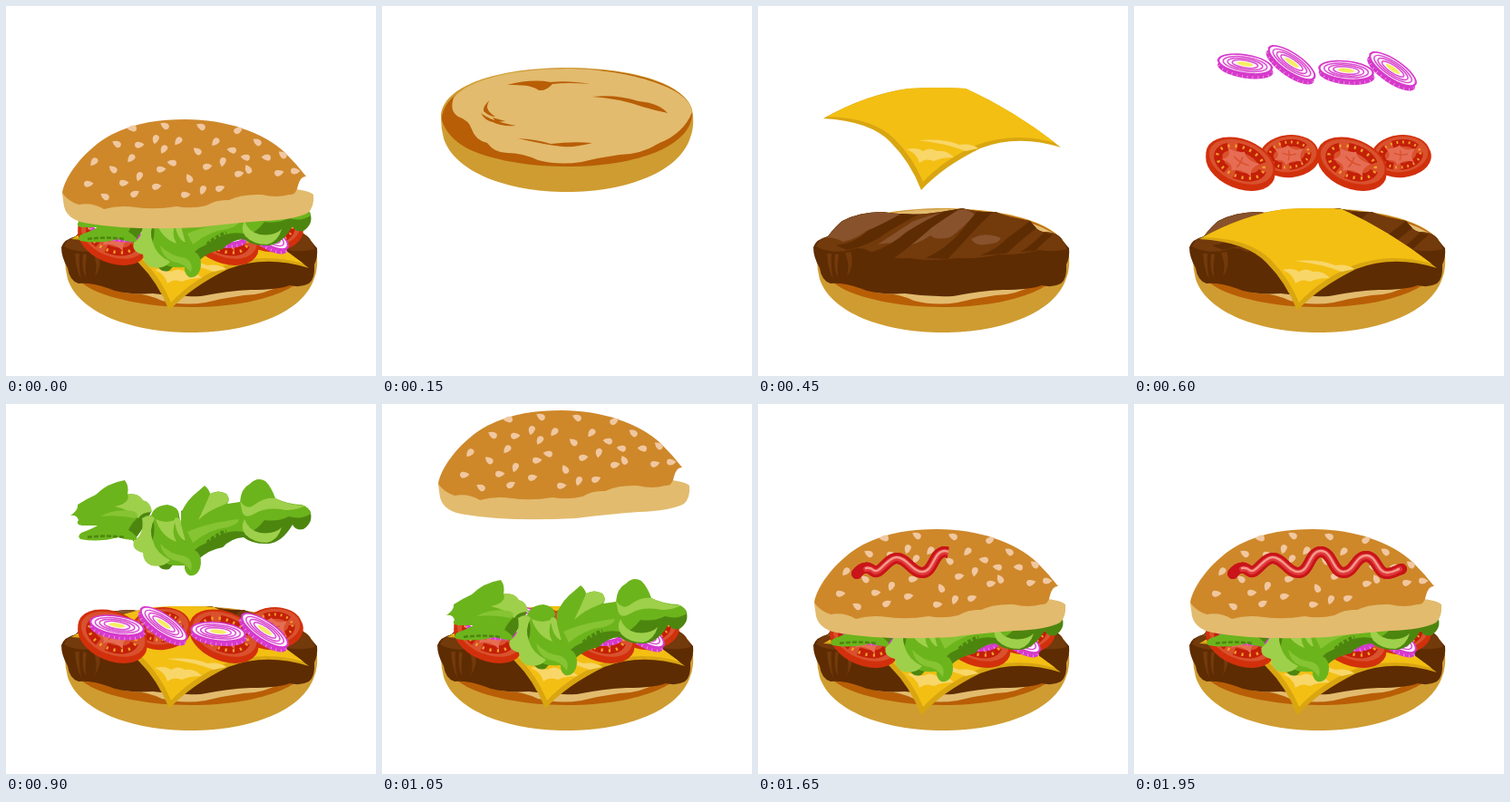
Write an HTML page that moves like this. It is 408 by 408 pixels and loops after 2250 ms.

```html
<!DOCTYPE html>
<html lang="en">
<head>
<meta charset="utf-8">
<title>Burger</title>
<style>
  html, body { margin: 0; width: 100%; height: 100%; overflow: hidden; background: #fff; }
  svg { display: block; width: 100vw; height: 100vh; }
  .part { animation: 2250ms step-end infinite; }
  #base { animation-name: base; }
  #patty { animation-name: patty; }
  #cheese { animation-name: cheese; }
  #tomatoes { animation-name: tomatoes; }
  #onions { animation-name: onions; }
  #lettuce { animation-name: lettuce; }
  #top { animation-name: top; }
  #reveal { animation-name: reveal; }

  /* each part enters above the stack, lands, then gets squeezed by the top */
  @keyframes base {
    0% { transform: none; }
    6.66% { transform: translateY(-155px); }
    13.33%, 100% { transform: none; }
  }
  @keyframes patty {
    0% { transform: none; }
    6.66% { transform: translateY(-500px); }
    13.33% { transform: translateY(-117px); }
    20%, 100% { transform: none; }
  }
  @keyframes cheese {
    0% { transform: none; }
    6.66% { transform: translateY(-500px); }
    20% { transform: translateY(-133px); }
    26.66% { transform: none; }
    60%, 100% { transform: translateY(7px); }
  }
  @keyframes tomatoes {
    0% { transform: none; }
    6.66% { transform: translateY(-500px); }
    26.66% { transform: translateY(-82px); }
    33.33% { transform: none; }
    60%, 100% { transform: translateY(5px); }
  }
  @keyframes onions {
    0% { transform: none; }
    6.66% { transform: translateY(-500px); }
    26.66% { transform: translateY(-180px); }
    33.33% { transform: translateY(-86px); }
    40% { transform: none; }
    60%, 100% { transform: translateY(6px); }
  }
  @keyframes lettuce {
    0% { transform: none; }
    6.66% { transform: translateY(-500px); }
    33.33% { transform: translateY(-164px); }
    40% { transform: translateY(-110px); }
    46.66% { transform: none; }
    60%, 100% { transform: translateY(7px); }
  }
  @keyframes top {
    0% { transform: translateY(-3px); }
    6.66% { transform: translateY(-500px); }
    46.66% { transform: translateY(-121px); }
    53.33% { transform: none; }
    60%, 100% { transform: translateY(10px); }
  }
  @keyframes reveal {
    0% { transform: none; }
    66.66% { transform: translateX(155px); }
    73.33% { transform: translateX(212px); }
    80% { transform: translateX(259px); }
    86.66%, 100% { transform: translateX(312px); }
  }
</style>
</head>
<body>
<svg viewBox="0 0 408 408">
  <defs>
    <g id="tomato">
      <ellipse cx="1.5" cy="4" rx="40" ry="25" fill="#d2300c"/>
      <ellipse rx="40" ry="25" fill="#d2300c"/>
      <ellipse cx=".5" cy="-.5" rx="37" ry="22.5" fill="#d9512d"/>
      <g fill="none">
        <ellipse rx="26" ry="15" stroke="#c41f08" stroke-width="9" stroke-dasharray="34 10"/>
        <ellipse rx="27" ry="16" stroke="#f2a32a" stroke-width="3.4" stroke-dasharray="2.2 6"/>
      </g>
      <path fill="#e66d54" d="M-19-9Q-6-8 0-12Q5-3 21-6Q11 2 17 11Q4 5-6 13Q-6 4-21 5Q-10-1-19-9Z"/>
      <path fill="none" stroke="#d9512d" stroke-width="1.6" d="M-9-3Q0 2 10 0M0-6Q1 2-2 7"/>
    </g>
    <g id="onion">
      <ellipse cx="1" cy="5" rx="31" ry="10.5" fill="#d63acb"/>
      <ellipse cx="1" cy="4" rx="30" ry="9.8" fill="none" stroke="#f0a4e8" stroke-width="3" stroke-dasharray=".8 5"/>
      <ellipse rx="31" ry="10.8" fill="#d63acb"/>
      <ellipse rx="28.6" ry="9.2" fill="#fff2fd"/>
      <g fill="none" stroke="#d94ccf" stroke-width="1.5">
        <ellipse rx="24.5" ry="7.6"/>
        <ellipse rx="19.5" ry="5.9"/>
        <ellipse rx="14.3" ry="4.1"/>
      </g>
      <ellipse rx="9" ry="2.3" fill="#f5ee62"/>
    </g>
    <path id="seed" fill="#f0c7a0" d="M-5.5 0Q-2-3.6 1.6-3.5Q5-3.2 5 .2Q4.8 3.5 1.4 3.4Q-2 3.3-5.5 0Z"/>
    <clipPath id="squeezed"><path id="reveal" class="part" d="M-400 150H0L-8 200H-400Z"/></clipPath>
  </defs>

  <g id="base" class="part">
    <path fill="#cf9c31" d="M65 278C65 242 130 223 204 223S343 242 343 276Q344 290 340 300C328 338 270 360 204 360S80 338 68 301Q65 290 65 278Z"/>
    <path fill="#b85e06" d="M66 281C65 246 128 224 204 224S342 244 342 275C340 308 285 332 204 332C150 332 112 321 94 312Q72 300 66 281Z"/>
    <path fill="#e2bb6e" d="M79 256C96 236 145 224 204 224S341 243 342 272C336 288 322 300 306 306Q285 319 262 319Q240 322 220 327Q195 331 172 325Q155 317 138 317Q124 317 116 306Q103 303 99 291Q96 281 84 277Q74 271 79 256Z"/>
    <g fill="#b85e06">
      <path d="M138 242Q165 235 186 239Q205 237 229 241Q205 239 188 241Q181 249 173 248Q165 241 138 242Z"/>
      <path d="M232 255Q258 252 283 260Q305 262 315 273Q300 270 287 266Q262 257 232 255Z"/>
      <path d="M150 301Q170 302 186 307Q210 304 232 306Q214 311 199 310Q180 308 150 301Z"/>
      <path d="M119 259Q111 265 112 271Q119 277 125 277Q117 272 116 267Q116 262 119 259ZM109 273Q120 282 148 287Q131 288 122 283Q113 281 109 273ZM122 278L136 282L126 283Z"/>
    </g>
  </g>

  <g id="patty" class="part"><g transform="translate(0 117)">
    <path fill="#5e2c02" d="M61 149Q64 140 77 137Q85 126 93 120Q112 110 137 110Q165 114 186 112Q212 109 225 106Q243 111 262 110Q275 116 300 120Q306 130 314 132Q332 132 336 142L343 150Q344 160 340 168Q341 184 334 189Q325 194 313 191Q300 196 270 196Q245 197 215 203Q188 204 162 200Q130 202 112 194Q95 188 80 189Q70 186 68 172Q61 160 61 149Z"/>
    <path fill="#733a0c" d="M64 148Q66 140 78 137Q85 126 93 120Q112 110 137 110Q165 114 186 112Q212 109 225 106Q243 111 262 110Q275 116 300 120Q306 130 314 132Q332 132 337 144L341 151Q325 155 310 152Q290 158 265 157Q245 162 220 161Q190 165 165 161Q140 163 122 153Q112 147 98 153Q78 156 64 148Z"/>
    <g fill="#87522c">
      <path d="M76 139Q84 127 94 120Q112 111 137 110Q150 112 157 113Q140 124 121 130Q108 140 94 143Q82 137 76 139Z"/>
      <path d="M132 146Q150 134 170 121Q190 112 228 107Q236 110 239 113Q226 128 212 138Q196 142 190 136Q178 145 162 148Q148 142 132 146Z"/>
      <path d="M235 140Q250 131 268 139Q266 145 251 146Q240 148 235 140Z"/>
    </g>
    <g fill="#5e2c02">
      <path d="M86 147Q108 144 121 131Q140 122 158 112L177 113Q158 123 145 131Q122 148 98 152Z"/>
      <path d="M124 155Q146 148 164 132Q188 117 207 109L222 107Q206 117 192 127Q168 148 150 161Q135 162 124 155Z"/>
      <path d="M185 161Q204 152 218 138Q232 122 241 110L259 110Q247 121 235 134Q220 151 209 162Z"/>
      <path d="M245 158Q264 151 276 138Q290 128 300 120L307 128Q291 140 274 156Z"/>
      <path d="M290 154Q304 145 315 133L325 135Q313 145 306 153Z"/>
    </g>
    <path fill="#733a0c" d="M76 156Q77 174 83 184Q80 170 81 156ZM85 156Q83 172 88 183Q87 169 89 157ZM96 155Q102 169 98 182Q107 168 102 154Z"/>
  </g></g>

  <g id="cheese" class="part">
    <path fill="#d9a611" d="M72 257Q120 230 166 224Q200 222 229 224Q282 248 334 289Q286 274 245 290Q204 310 180 336Q168 305 146 283Q124 260 72 257Z"/>
    <path fill="#f3bf13" d="M76 255Q120 231 166 224Q200 222 229 224Q282 248 328 284Q284 271 242 286Q205 302 182 327Q171 300 150 279Q126 256 76 255Z"/>
    <g fill="#f8d668">
      <path d="M164 291Q175 288 182 293Q190 288 197 293Q208 291 216 300Q202 300 194 304Q185 300 178 306Q176 296 164 291Z"/>
      <path d="M177 281Q205 279 222 286Q235 284 243 290L229 293Q205 284 177 281Z"/>
    </g>
  </g>

  <g id="tomatoes" class="part">
    <use href="#tomato" transform="translate(171 246) rotate(-6) scale(.81 .87)"/>
    <use href="#tomato" transform="translate(117.5 254) rotate(22)"/>
    <use href="#tomato" transform="translate(294 246) rotate(-6) scale(.81 .87)"/>
    <use href="#tomato" transform="translate(240.5 254) rotate(22)"/>
  </g>

  <g id="onions" class="part">
    <use href="#onion" transform="translate(122.5 244) rotate(9)"/>
    <use href="#onion" transform="translate(174 242.5) rotate(34)"/>
    <use href="#onion" transform="translate(234 251) rotate(6)"/>
    <use href="#onion" transform="translate(285.5 249.5) rotate(34)"/>
  </g>

  <g id="lettuce" class="part"><g transform="translate(0 110)">
    <path fill="#4d860f" d="M193 118Q236 102 246 112L262 107Q270 120 298 112L335 117Q340 130 328 138Q319 140 316 133Q305 152 290 154Q272 155 262 147Q248 148 239 158Q225 160 211 172L195 155Z"/>
    <path fill="#6cb41c" d="M193 120Q200 105 211 97L219 90Q224 94 225 99Q234 94 243 99Q248 105 244 110L258 108Q259 93 269 88Q277 80 286 85Q293 92 297 104Q312 111 326 111Q334 113 336 121Q326 128 312 124Q300 130 285 128Q272 145 262 141Q245 138 232 147Q222 153 213 157L203 165L193 150Z"/>
    <path fill="#9ed04b" d="M225 99Q235 94 243 99Q250 108 238 112Q222 118 212 128Q222 107 225 99ZM258 107Q266 118 274 111Q286 102 297 104Q312 112 330 112Q316 119 303 116Q286 114 274 121Q262 128 260 117ZM263 127Q267 139 280 142Q296 144 304 136Q300 150 288 153Q273 153 264 144Q258 137 263 127Z"/>
    <path fill="#86c433" d="M200 141Q222 131 257 127Q256 133 244 136Q224 138 206 153Z"/>
    <path fill="none" stroke="#4d860f" stroke-width="4" stroke-dasharray="4 2" d="M218 160Q226 148 241 146M222 153Q230 145 243 140"/>

    <path fill="#4d860f" d="M118 133Q140 112 160 119L154 132Q148 142 140 152Q140 142 130 141Z"/>
    <path fill="#6cb41c" d="M71 123Q80 117 79 111Q88 105 99 100Q112 87 131 84Q136 91 134 99Q145 98 150 105Q155 116 148 123Q139 130 135 139Q145 145 145 150Q135 151 124 147Q102 153 82 149Q78 146 83 142Q94 138 101 134L84 134Q76 133 80 128Q78 122 71 123Z"/>
    <path fill="#9ed04b" d="M134 99Q147 98 151 106Q160 108 161 119Q150 119 146 126Q138 117 120 113Q138 109 134 99Z"/>
    <path fill="#86c433" d="M104 124Q120 115 139 118Q149 121 142 126Q124 122 104 124Z"/>
    <path fill="none" stroke="#4d860f" stroke-width="2.5" stroke-dasharray="5 2" d="M90 147Q110 144 130 147"/>
    <path fill="#4d860f" d="M150 128Q168 116 190 120L200 160L180 182Q172 184 168 178Q150 172 150 150Z"/>
    <path fill="#6cb41c" d="M160 123Q163 112 178 111Q190 113 191 122Q187 129 192 140Q196 155 211 163Q217 170 214 181Q210 191 202 189Q196 185 197 178Q180 180 168 171Q158 160 163 145Q165 133 160 123Z"/>
    <path fill="#9ed04b" d="M150 126Q159 120 164 126Q157 139 162 151Q165 164 181 172Q174 181 160 178Q151 174 151 164Q138 161 141 151Q153 143 150 126ZM165 127Q177 133 188 127Q181 141 188 152Q171 146 165 127ZM186 126Q193 123 193 132L198 151Q187 146 186 126Z"/>
    <path fill="#86c433" d="M170 154Q181 166 198 168Q207 173 204 184Q196 173 184 172Q172 167 170 154Z"/>
  </g></g>

  <g id="top" class="part">
    <path fill="#e2bb6e" d="M62 210Q70 200 200 200T339 211Q340 225 333 231Q318 239 283 240Q245 243 214 247Q140 251 92 243Q68 240 64 224Z"/>
    <path fill="#ce882a" d="M62 209C65 190 88 160 116 145C144 131 170 128 198 128C242 128 284 142 308 165Q321 178 331 191Q325 190 322 201Q320 212 312 211Q298 215 282 211Q260 210 246 217Q232 216 221 223Q205 227 188 224Q165 228 143 225Q125 222 108 227Q95 219 80 222Q68 218 62 209Z"/>
    <g id="seeds"></g>
  </g>

  <g clip-path="url(#squeezed)" fill="none" stroke-linecap="round">
    <path id="sauce" stroke="#c9141a" stroke-width="12" d="M109 187C116 178 122 180 127 184C134 190 142 170 153 170C164 170 170 186 181 186C194 186 193 163 206 163C219 163 219 186 231 186C243 186 244 168 256 168C268 168 268 187 279 187C286 187 290 183 295 182"/>
    <use href="#sauce" id="glow"/>
    <path stroke="#e0383a" stroke-width="6" d="M119 182Q124 181 127 184C134 190 142 170 153 170C164 170 170 186 181 186C194 186 193 163 206 163C219 163 219 186 231 186C243 186 244 168 256 168C268 168 268 187 279 187C286 187 290 183 293 182"/>
    <path stroke="#f39a8c" stroke-width="2.4" d="M119 181Q124 180 127 183C134 189 142 169 153 169C164 169 170 185 181 185C194 185 193 162 206 162C219 162 219 185 231 185C243 185 244 167 256 167C268 167 268 186 279 186C286 186 289 183 292 182"/>
  </g>
</svg>
<script>
  // x, y, angle
  const seeds = [
    [139, 138, 0], [175, 135, 30], [215, 136, 25], [256, 140, 150], [122, 155, 30],
    [147, 156, 175], [165, 150, 285], [190, 152, 310], [174, 161, 300], [211, 163, 40],
    [231, 153, 310], [249, 162, 10], [277, 153, 35], [305, 167, 40], [287, 170, 5],
    [264, 170, 10], [97, 175, 310], [118, 183, 40], [138, 171, 310], [183, 176, 10],
    [171, 183, 175], [222, 180, 170], [239, 175, 280], [147, 191, 290], [130, 198, 175],
    [91, 199, 175], [166, 202, 170], [202, 193, 60], [236, 204, 160], [257, 188, 170],
    [267, 183, 60], [301, 187, 165], [319, 185, 180], [142, 210, 150], [109, 213, 30],
    [198, 211, 175], [217, 206, 290]
  ];
  document.getElementById("seeds").innerHTML = seeds.map(([x, y, a]) =>
    `<use href="#seed" transform="translate(${x} ${y}) rotate(${a})"/>`).join("");
</script>
</body>
</html>
```
